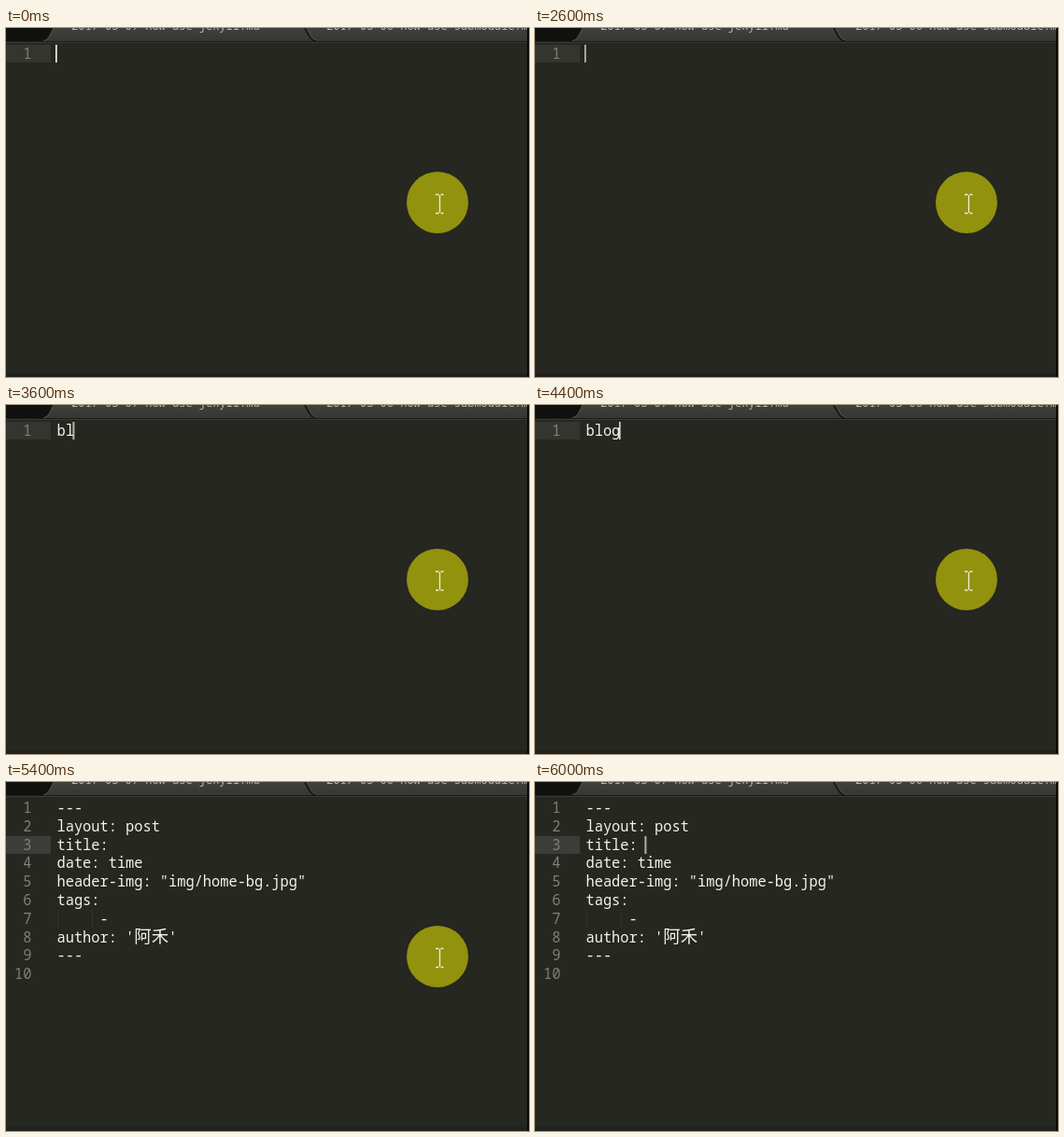
An HTML page for the animation above (6200 ms loop, 560 by 374 pixels).

```html
<!DOCTYPE html>
<html lang="en">
<head>
<meta charset="utf-8">
<title>Editor snippet</title>
<style>
  html, body { margin: 0; width: 100%; height: 100%; overflow: hidden; background: #252720; }
  svg { display: block; width: 560px; height: 374px; }
  text { white-space: pre; font-variant-ligatures: none; }
  .code { font: 15.33px "Noto Sans Mono", "DejaVu Sans Mono", monospace; fill: #f4f4ee; }
  .cjk { font: 18.4px "Noto Sans CJK SC", "Noto Sans CJK", sans-serif; }
  .num { fill: #7f8078; text-anchor: end; }
  .tab { font: 12px "Noto Sans Mono", "DejaVu Sans Mono", monospace; fill: #b4b8b6; }
  .guide { stroke: #55493f; stroke-dasharray: 1 2; }

  .before, .after, .typed, .caret, .pointer { animation: 6200ms step-end infinite; }
  .before { animation-name: before; }
  .after { animation-name: after; }
  .typed { animation-name: typed; }
  .caret { animation-name: caret; }
  .pointer { animation-name: pointer; }

  @keyframes before { 0% { visibility: visible } 74.19%, 100% { visibility: hidden } }
  @keyframes after { 0% { visibility: hidden } 74.19%, 100% { visibility: visible } }
  @keyframes typed {
    0% { width: 0 }
    51.61% { width: 9.2px }
    58.06% { width: 18.4px }
    61.29% { width: 27.6px }
    64.51%, 100% { width: 36.8px }
  }
  @keyframes caret {
    0% { transform: translate(53px, 18px); opacity: 1 }
    6.45% { transform: translate(53px, 18px); opacity: .75 }
    32.25% { transform: translate(53px, 18px); opacity: 0 }
    41.93% { transform: translate(53px, 18px); opacity: .75 }
    51.61% { transform: translate(62px, 18px); opacity: .85 }
    58.06% { transform: translate(71.5px, 18px); opacity: .85 }
    61.29% { transform: translate(80.5px, 18px); opacity: .85 }
    64.51% { transform: translate(90px, 18px); opacity: .85 }
    74.19% { transform: translate(117.5px, 58px); opacity: .8 }
    83.87% { transform: translate(117.5px, 58px); opacity: 0 }
    96.77%, 100% { transform: translate(117.5px, 58px); opacity: .8 }
  }
  @keyframes pointer {
    0% { transform: translate(462px, 187px); opacity: 1 }
    90.32% { transform: translate(297px, 303px); opacity: 1 }
    93.54%, 100% { transform: translate(297px, 303px); opacity: 0 }
  }
</style>
</head>
<body>
<svg viewBox="0 0 560 374">
  <defs>
    <linearGradient id="bar" x2="0" y2="1">
      <stop stop-color="#40403d"/>
      <stop offset="1" stop-color="#363733"/>
    </linearGradient>
    <clipPath id="typedClip"><rect class="typed" x="54" y="16" height="24"/></clipPath>
  </defs>

  <rect width="560" height="374" fill="#252720"/>

  <!-- tab bar -->
  <rect width="560" height="14" fill="#11120f"/>
  <path d="M40 14Q45 13 47 8L51 0H560V14Z" fill="url(#bar)"/>
  <path d="M40 14Q45 13 47 8L51 0" fill="none" stroke="#55564f"/>
  <path d="M320 0L325 9Q328 14 333 14" fill="none" stroke="#181915" stroke-width="2"/>
  <path d="M322 0L327 9Q329 13 334 13.5" fill="none" stroke="#55564f" stroke-width=".8"/>
  <rect y="14" width="560" height="1" fill="#1b1c18"/>
  <rect y="15" width="560" height="1" fill="#393a34"/>
  <text class="tab" x="70" y="2">2017-03-07-how-use-jekyll.md</text>
  <text class="tab" x="288" y="2">×</text>
  <text class="tab" x="343" y="2">2017-03-06-how-use-submodule.md</text>

  <g class="code">
    <g class="before">
      <rect y="18" width="48" height="19" fill="#34352e"/>
      <text class="num" x="27.5" y="33">1</text>
      <text x="54.5" y="33" clip-path="url(#typedClip)">blog</text>
    </g>

    <g class="after">
      <rect y="58" width="48" height="19" fill="#3c3d38"/>
      <g class="num">
        <text x="27.5" y="33">1</text>
        <text x="27.5" y="53">2</text>
        <text x="27.5" y="73">3</text>
        <text x="27.5" y="92">4</text>
        <text x="27.5" y="112">5</text>
        <text x="27.5" y="132">6</text>
        <text x="27.5" y="152">7</text>
        <text x="27.5" y="172">8</text>
        <text x="27.5" y="191">9</text>
        <text x="27.5" y="211">10</text>
      </g>
      <path class="guide" d="M55.5 137V157M92.5 137V157"/>
      <text x="54.5" y="33">---</text>
      <text x="54.5" y="53">layout: post</text>
      <text x="54.5" y="73">title: </text>
      <text x="54.5" y="92">date: time</text>
      <text x="54.5" y="112">header-img: "img/home-bg.jpg"</text>
      <text x="54.5" y="132">tags:</text>
      <text x="100.5" y="152">-</text>
      <text x="54.5" y="172">author: '<tspan class="cjk">阿禾</tspan>'</text>
      <text x="54.5" y="191">---</text>
    </g>
  </g>

  <rect class="caret" width="1.6" height="19" fill="#f8f8f2"/>

  <g class="pointer">
    <circle r="33" fill="#92920f"/>
    <path d="M-2 -8.5H1.5M3.5 -8.5H6.5M-2 11.5H1.5M3.5 11.5H6.5M2.5 -8V11" fill="none" stroke="#eeeed8" stroke-width="1.3"/>
  </g>

  <rect y="370" width="560" height="4" fill="#20211d"/>
  <rect x="558" width="2" height="374" fill="#080906"/>
</svg>
</body>
</html>
```
